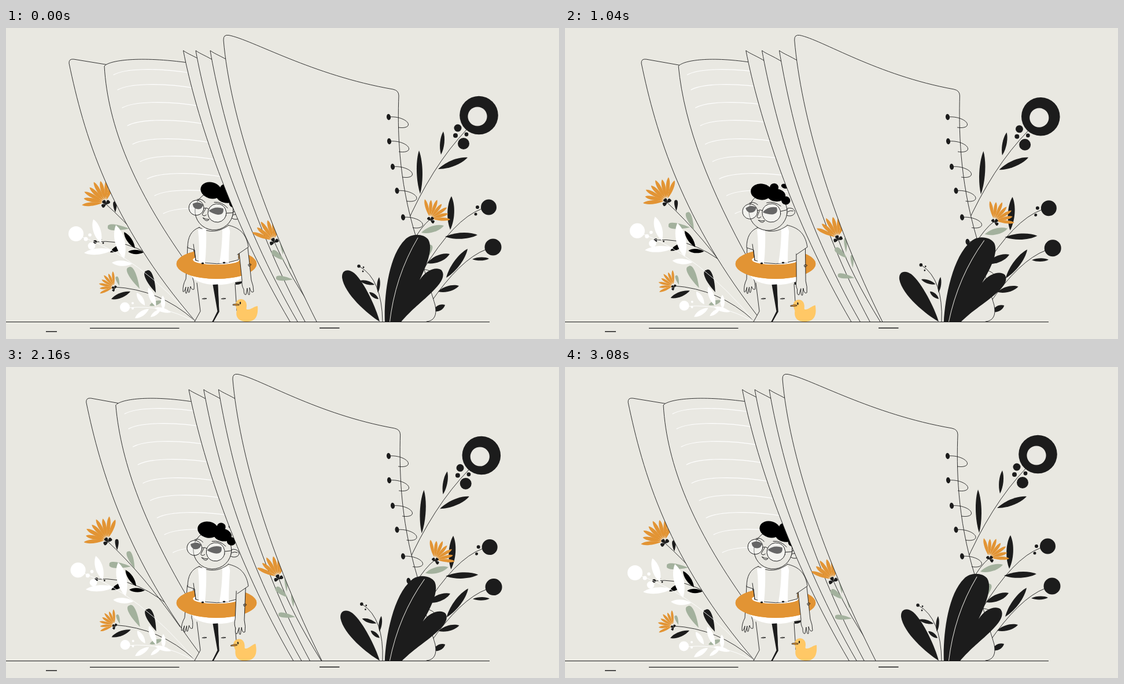
An HTML page for the animation above (3120 ms loop, 956 by 538 pixels).

```html
<!DOCTYPE html>
<html lang="en">
<head>
<meta charset="utf-8">
<title>Notebook garden</title>
<style>
html, body { margin: 0; width: 100%; height: 100%; overflow: hidden; background: #e9e8e1; }
svg { display: block; width: 956px; height: 538px; }
</style>
</head>
<body>
<svg id="stage" viewBox="0 0 956 538" xmlns="http://www.w3.org/2000/svg"></svg>
<script>
const LOOP = 3120, STEP = 40;
const PAPER = '#e9e8e2', INK = '#1c1c1c', ORANGE = '#e29434', SAGE = '#a3b19d', WHITE = '#fff';
const stage = document.getElementById('stage');

// drawing helpers
const dot = (x, y, r, fill = INK) => `<circle cx="${x}" cy="${y}" r="${r}" fill="${fill}"/>`;
const oval = (x, y, rx, ry, fill, more = '') =>
  `<ellipse cx="${x}" cy="${y}" rx="${rx}" ry="${ry}" fill="${fill}" ${more}/>`;
const shape = (d, fill) => `<path d="${d}" fill="${fill}"/>`;
const line = (d, color = INK, width = 0.9) =>
  `<path d="${d}" fill="none" stroke="${color}" stroke-width="${width}"/>`;
const outlined = d => `<path d="${d}" fill="${PAPER}" stroke="${INK}" stroke-width=".9"/>`;

// leaf from base to tip; a larger bulge moves the widest part towards the tip
function leaf(x1, y1, x2, y2, w, fill = INK, bulge = 0) {
  const dx = x2 - x1, dy = y2 - y1, len = Math.hypot(dx, dy);
  const at = (k, s) => `${(x1 + dx * k - dy / len * w * s).toFixed(1)} ${(y1 + dy * k + dx / len * w * s).toFixed(1)}`;
  const a = 0.3 + bulge, b = 0.75 + bulge;
  return shape(`M${x1} ${y1}C${at(a, .7)} ${at(b, .7)} ${x2} ${y2}C${at(b, -.7)} ${at(a, -.7)} ${x1} ${y1}Z`, fill);
}
const drop = (x1, y1, x2, y2, w, fill) => leaf(x1, y1, x2, y2, w, fill, 0.3);

function flower(x, y, size, from, to, count) {
  let out = '';
  const ray = (a, r) => [x + size * r * Math.cos(a), y + size * r * Math.sin(a)];
  for (let i = 0; i < count; i++) {
    const a = (from + (to - from) * i / (count - 1)) * Math.PI / 180;
    out += leaf(...ray(a, 0.12), ...ray(a, i % 2 ? 0.93 : 1), size * 0.15, ORANGE, 0.1);
  }
  const mid = (from + to) / 2;
  for (const spread of [-80, 0, 80]) {
    const a = (mid + spread) * Math.PI / 180;
    out += drop(x + 1, y + 3, x + 1 + size * .2 * Math.cos(a), y + 3 + size * .2 * Math.sin(a), size * .15, INK);
  }
  return out;
}
const sway = (x, y, deg, inner) => `<g data-sway="${deg} ${x} ${y}">${inner}</g>`;

const leftPlants =
  sway(325, 508, 1.4,
    line('M172 304Q235 360 300 450') +
    drop(189, 319, 188, 300, 6) + drop(213, 347, 176, 344, 10, SAGE) + drop(220, 351, 208, 321, 9, SAGE) +
    flower(172, 302, 41, -186, -70, 8)) +
  sway(325, 508, 1.4,
    line('M155 370Q225 362 300 430') +
    dot(154, 370, 3) + dot(164, 366, 1.4) + dot(168, 372, 1.4) +
    leaf(223, 381, 204, 353, 8, '#000') + leaf(238, 388, 211, 387, 7, '#000') + leaf(206, 374, 180, 388, 8, '#000')) +
  sway(325, 508, 1.1,
    line('M187 448Q265 452 325 505') +
    drop(259, 458, 243, 420, 13) + leaf(215, 456, 182, 469, 8) +
    drop(231, 451, 212, 414, 12, SAGE) + drop(196, 446, 191, 430, 5, SAGE) + leaf(270, 472, 248, 480, 7, SAGE) +
    flower(187, 448, 27, -204, -95, 7)) +
  sway(325, 508, 1.95,
    line('M128 360Q230 396 325 505', WHITE) +
    dot(121, 356, 13, WHITE) + dot(138, 365, 3.5, WHITE) + dot(145, 358, 2.8, WHITE) + dot(148, 377, 6.4, WHITE) +
    leaf(164, 372, 151, 331, 12, WHITE) + leaf(204, 399, 190, 341, 16, WHITE) +
    leaf(184, 384, 135, 389, 10, WHITE) + leaf(218, 408, 183, 406, 9, WHITE)) +
  sway(325, 508, 1.7,
    line('M212 484Q270 478 322 506', WHITE) +
    dot(205.5, 483, 8.5, WHITE) + dot(219, 476, 2, WHITE) + dot(219, 485, 2, WHITE) +
    leaf(240, 480, 226, 458, 8, WHITE) + leaf(259, 482, 246, 449, 9, WHITE) +
    leaf(247, 486, 223, 502, 8, WHITE) + leaf(285, 492, 257, 484, 7, WHITE) +
    leaf(272, 487, 271, 463, 7, WHITE) + leaf(268, 486, 250, 500, 6, WHITE));

const rightPlants =
  sway(655, 508, 1.03,
    line('M797 175Q735 240 690 345') +
    dot(817.5, 151, 33.3) + dot(815, 153, 16.6, PAPER) +
    dot(781, 173, 6.5) + dot(777, 186, 4) + dot(796, 184, 3.4) + dot(791, 200, 10) +
    sway(752, 219, 6, leaf(752, 219, 756, 179, 7)) +
    sway(747, 244, -3, leaf(747, 244, 798, 224, 10)) +
    sway(716, 287, 5.5, leaf(716, 287, 714, 212, 9.5))) +
  sway(655, 508, 0.72,
    line('M822 313Q775 330 720 420') + line('M830 383Q785 400 732 478') +
    dot(834.5, 310, 13.5) + dot(815, 310, 3) + dot(812, 322, 2.5) + dot(842, 379, 14.5) +
    sway(768, 349, 2, leaf(768, 349, 770, 291, 11)) + leaf(759, 361, 815, 358, 10) + leaf(728, 407, 767, 391, 11) +
    leaf(761, 432, 798, 382, 11) + leaf(806, 400, 835, 399, 5.5) + leaf(747, 456, 783, 446, 9) +
    leaf(738, 490, 759, 479, 9)) +
  sway(665, 508, 3.85,
    line('M733 331Q718 343 700 375') +
    leaf(718, 354, 757, 342, 10, SAGE) + drop(722, 405, 734, 375, 11, SAGE) +
    flower(733, 330, 35, -105, 2, 7));

const frontPlants =
  sway(646, 508, -3.1,
    shape('M646 508C625 495 585 460 581 432C580 418 592 416 602 424C620 440 640 485 646 508Z', INK)) +
  sway(651, 508, 4.2,
    line('M612 413Q650 435 651 508') +
    dot(610, 412, 2.8) + dot(618, 414, 1.4) + dot(617, 421, 1.4) +
    leaf(637, 444, 612, 437, 6) + leaf(644, 469, 628, 457, 6) + leaf(643, 458, 645, 431, 5)) +
  sway(665, 508, 6.7,
    shape('M655 512C653 470 660 395 690 366C700 355 722 355 730 366C738 380 730 405 715 436C726 418 745 412 753 419C761 430 750 444 732 461C712 480 700 488 680 512Z', INK) +
    line('M663 512Q672 430 712 363', PAPER, 1));

const centreFlower = sway(545, 508, 4.6,
  line('M463 368Q490 430 545 508') +
  drop(481, 402, 460, 386, 9, SAGE) + drop(496, 435, 467, 432, 8, SAGE) +
  drop(479, 392, 476, 367, 5, SAGE) + drop(492, 418, 489, 396, 5, SAGE) +
  flower(463, 368, 40, -159, -72, 6));

const head =
  outlined('M375 312C384 305 394 310 392 317C389 323 380 324 376 320') +
  line('M379 316Q384 312 389 313') +
  `<circle cx="346" cy="318.5" r="33" fill="${PAPER}" stroke="${INK}" stroke-width=".9"/>` +
  oval(331, 286, 18.5, 14, '#000') + oval(352, 276, 7.5, 7, '#000') + oval(357, 289, 16, 11, '#000') +
  oval(374.5, 296.5, 7.7, 7.2, '#000') + oval(370, 272, 6.2, 4, '#000', 'transform="rotate(8 370 272)"') +
  `<g id="eyes">${shape('M307 316Q316 308 325 313Q325 323 314 323Q308 321 307 316ZM337 320Q345 308 360 309Q365 319 354 322Q345 323 337 320Z', '#000')}</g>` +
  `<g fill="#fff" fill-opacity=".4" stroke="${INK}" stroke-width=".9">
    <circle cx="315" cy="322" r="13"/><circle cx="352" cy="320.5" r="16"/></g>` +
  line('M328 319Q332 316 336 318M368 316L379 312M312 308Q319 303 327 309M342 304Q354 299 367 307') +
  line('M331 319L328 330Q331 334 335 329') +
  outlined('M331 335.5Q337 337 342 335Q339 342 331 335.5Z');

const legs =
  shape('M330 443L336 490L326 508H357L363 490L357 445ZM366 445L368 491L358 508H404L399 489L396 443Z', PAPER) +
  oval(365, 425, 45, 19.5, WHITE) +
  shape('M396 440L409 438Q408 444 397 444Z', INK) +
  shape('M357.5 444L366 443.5L368.5 491L359 508H356.5L365.5 490Z', INK) +
  line('M330 441L336 490L326 508M366 444L368 491L357 508M396 443L399 489') +
  line('M339.5 468.5Q343 466.5 347 468Q343 470 339.5 468.5ZM372.5 468.5Q376 466.5 380 468Q376 470 372.5 468.5Z');

const leftArm = `<g id="leftArm">${outlined('M314 378L311 434Q305 445 306 456Q308 458 311 448Q309 460 312 459L315 448Q314 460 317 457L319 447Q321 454 325 452Q326 440 323 434L325 378')}</g>`;
const rightArm = `<g id="rightArm">${
  outlined('M403 388L408 436Q407 446 411 452Q411 463 415 461L417 450Q418 464 421 461L421 449Q424 460 428 456Q428 446 424 436L418 380')
}${line('M419 409Q422 407 424 409Q423 412 420 412Z')}</g>`;

const torso =
  outlined('M334 345C320 350 314 362 314 380L326 384L328 402Q364 414 402 401L402 380L385 341Q360 360 334 345Z') +
  line('M324 374L328 402') +
  shape('M332 349L346 346Q347 378 344 407L333 406Q335 376 332 349Z', WHITE) +
  shape('M374 348L388 343Q385 376 385 406L369 407Q374 376 374 348Z', WHITE);

const ring = `<path fill="${ORANGE}" fill-rule="evenodd" d="M294.7 408a69.3 26 0 1 0 138.6 0a69.3 26 0 1 0-138.6 0ZM323 400.5Q324 409.5 364 409.5Q403 409.5 404 400.5Q402 392 364 392Q325 392 323 400.5Z"/>`;
const character =
  leftArm + legs + oval(364, 408, 69.3, 26, ORANGE) + oval(363.5, 401, 40.5, 8.5, WHITE) +
  torso + `<g clip-path="url(#ringFront)">${ring}</g>` +
  oval(340, 407, 2.3, 1.6, INK) + oval(377, 406, 2.3, 1.6, INK) +
  rightArm + outlined('M384 341C400 345 415 352 419 379L400 392') +
  `<g id="head">${head}</g>`;

const duck = `<g id="duck">${
  shape('M397 480C396 466 416 465 416 480C416 485 414 487 418 487C424 487 428 482 435 481C436 494 434 508 417 508C402 508 396 500 399 488Z', '#ffc866')
}<path d="M392.5 478Q398 476.5 403 478V479.6Q398 480.5 392.5 479.6Z" fill="${ORANGE}" stroke="${INK}" stroke-width=".7"/>${
  oval(405, 475.8, 1.2, 2.2, INK)}</g>`;

const loops = [[661.5, 154], [662.5, 196], [668.5, 240], [676, 281.5], [686.5, 327.5], [696, 370], [709, 417]]
  .map(([x, y]) => oval(x, y, 3.5, 5.2, INK, `transform="rotate(-8 ${x} ${y})"`) +
    line(`M${x} ${y}c17-2 34 6 34 13c0 5-9 6.5-17 5`)).join('');

const sheet = name =>
  `<path id="${name}Fill" fill="${PAPER}"/><path id="${name}" fill="none" stroke="${INK}" stroke-width=".9"/>`;

stage.innerHTML = `
<clipPath id="above"><rect width="956" height="508.6"/></clipPath>
<clipPath id="ringFront"><rect x="290" y="400" width="150" height="40"/></clipPath>
<rect width="956" height="538" fill="#e9e8e1"/>
<g clip-path="url(#above)" stroke-linejoin="round" stroke-linecap="round">
${leftPlants}${rightPlants}${sheet('back')}${sheet('ruled')}
<path id="rules" fill="none" stroke="#fff" stroke-width="1.1"/>
${character}${duck}
${sheet('leaf0')}${sheet('leaf1')}${sheet('leaf2')}${centreFlower}${sheet('cover')}
${loops}${frontPlants}</g>
${line('M0 508.5H836', INK, 1)}${line('M69 525.3H88M145 519.4H299.5M542 519H576.5', INK, 1.4)}`;

const byId = id => document.getElementById(id);
const swaying = [...stage.querySelectorAll('[data-sway]')].map(el => {
  const [deg, x, y] = el.dataset.sway.split(' ').map(Number);
  return { el, deg, x, y };
});

// motion helpers
const smooth = k => (1 - Math.cos(Math.PI * Math.min(1, Math.max(0, k)))) / 2;
const swell = (t, start, peak, end = LOOP) =>
  t < peak ? smooth((t - start) / (peak - start)) : 1 - smooth((t - peak) / (end - peak));
const headKeys = [[0, 16.5], [580, 0], [700, 0], [1500, 16], [1660, 16], [2120, 13], [2560, 13], [LOOP, 16.5]];
function keyed(keys, t) {
  const i = keys.findIndex(k => k[0] > t), [t0, a] = keys[i - 1], [t1, b] = keys[i];
  return a + (b - a) * smooth((t - t0) / (t1 - t0));
}
const turn = (el, deg, x, y) => el.setAttribute('transform', `rotate(${deg.toFixed(3)} ${x} ${y})`);
function setSheet(name, d, closing) {
  byId(name).setAttribute('d', d);
  byId(name + 'Fill').setAttribute('d', d + closing + 'Z');
}

const lineY = [81, 107, 138, 169, 201, 231, 261, 290, 321];
const lineX = [186, 193, 201, 210, 219, 232, 244, 257, 272];
// tip x, edge controls, foot x, travel of each, start and peak time
const innerLeaves = [
  { tip: 306.5, c1: 328, c2: 386, foot: 491, move: [11.8, 12, 9, 7], start: 260, peak: 1760 },
  { tip: 328, c1: 348, c2: 401, foot: 504, move: [19.5, 20, 11, 9.5], start: 210, peak: 1610 },
  { tip: 353, c1: 372, c2: 421, foot: 517, move: [22.5, 22, 13, 13], start: 60, peak: 1490 }
];

function draw(t) {
  const wind = swell(t, 0, LOOP / 2);
  for (const s of swaying) turn(s.el, s.deg * wind, s.x, s.y);

  let u = swell(t, 0, 1780);
  const m = (a, d) => (a + d * u).toFixed(2);
  setSheet('back',
    `M${m(328, 20)} 508C${m(177, 40)} 334 ${m(134, 36)} 180 ${m(109, 36.5)} 61Q${m(108.5, 36.5)} 53 ${m(117, 36.5)} 54L${m(181, 29)} 64.5`,
    'L500 508');

  u = swell(t, 0, 1450);
  setSheet('ruled',
    `M${m(312, 10)} 406C${m(222, 35)} 280 ${m(176, 37)} 170 ${m(170, 32)} 66C${m(178, 32)} 56 ${m(230, 26)} 48 ${m(318, 12)} 60.5`,
    'L430 406');
  byId('rules').setAttribute('d', lineY.map((y, i) => {
    const x = lineX[i] + (31 - i * 0.5) * u;
    return `M${x.toFixed(2)} ${y}c18-10 70-14 140-2`;
  }).join(''));

  innerLeaves.forEach((p, i) => {
    u = swell(t, p.start, p.peak);
    const tip = p.tip + p.move[0] * u;
    setSheet('leaf' + i,
      `M${m(p.foot, p.move[3])} 508C${m(p.c2, p.move[2])} 330 ${m(p.c1, p.move[1])} 150 ${tip.toFixed(2)} 39c8 6 18 9 34 19`,
      'L560 508');
  });

  u = swell(t, 0, 1460);
  setSheet('cover',
    `M${m(537, 14.5)} 508C${m(447, 16)} 330 ${m(387, 26)} 150 ${m(376, 25.6)} 21Q${m(375.5, 25.6)} 11 ${m(385, 25.6)} 12.5` +
    `C${m(425, 23)} 20 ${m(530, 12)} 82 ${m(669, 4)} 106Q${m(679, 4)} 108 ${m(679, 4.2)} 117` +
    `C${m(677, 5)} 170 ${m(677, 5)} 260 ${m(709, 3)} 362C720 415 732 445 742 480Q747 506 727 508`, '');

  const tilt = keyed(headKeys, t);
  turn(byId('head'), tilt, 360, 365);
  byId('eyes').setAttribute('transform', `translate(${(8 * Math.max(0, 1 - tilt / 6)).toFixed(2)} 1)`);
  turn(byId('leftArm'), -4 * (1 - tilt / 16.5) + 3 * swell(t, 900, 1800), 322, 360);
  turn(byId('rightArm'), 9.5 * swell(t, 0, 1880), 405, 355);
  turn(byId('duck'), -7.5 * swell(t % (LOOP / 2), 0, 660, LOOP / 2), 416, 508);
}

const began = performance.now();
function frame() {
  const t = (performance.now() - began) % LOOP;
  draw(Math.floor(t / STEP) * STEP);
  requestAnimationFrame(frame);
}
draw(0);
requestAnimationFrame(frame);
</script>
</body>
</html>
```
